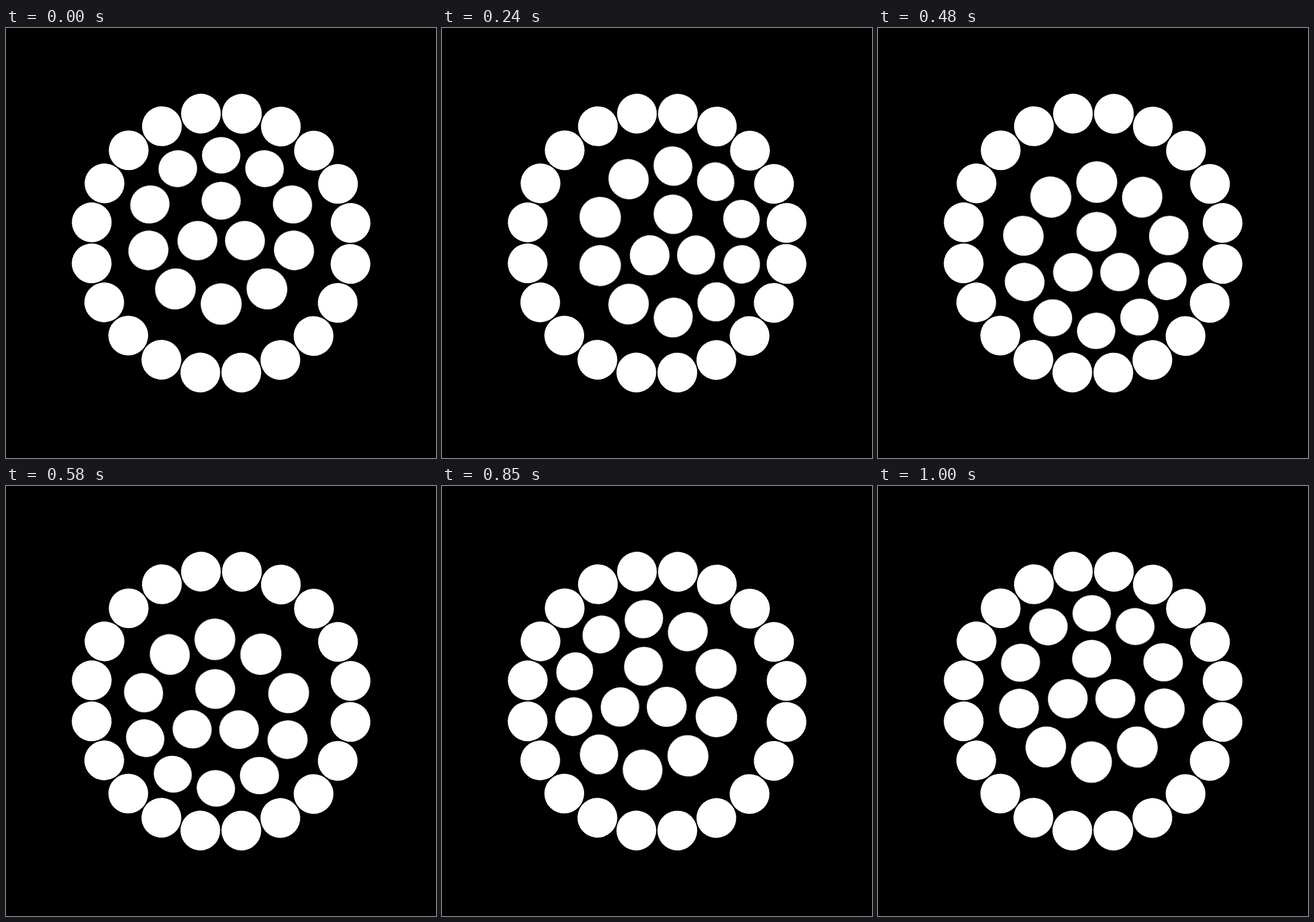
An HTML page without scripts that plays this animation: 720x720 px, repeating every 1030 ms.

```html
<!DOCTYPE html>
<html lang="en">
<head>
<meta charset="utf-8">
<title>Wobbling dots</title>
<style>
  @property --lean {
    syntax: "<angle>";
    inherits: false;
    initial-value: 0deg;
  }
  html, body {
    margin: 0;
    width: 100%;
    height: 100%;
    overflow: hidden;
    background: #000;
  }
  svg {
    position: absolute;
    fill: #fff;
  }
  .ring {
    left: 0;
    top: 0;
    width: 720px;
    height: 720px;
  }
  /* A tilted plate whose lean direction circles clockwise */
  .plate {
    left: 190px;
    top: 190px;
    width: 340px;
    height: 340px;
    transform: perspective(604px) translateZ(-169.1px)
      rotateZ(var(--lean)) rotateX(9.1deg) rotateZ(calc(-1 * var(--lean)))
      translateZ(171.3px);
    animation: wobble 1030ms infinite;
  }
  @keyframes wobble {
    0% { --lean: 0deg; animation-timing-function: steps(16); }
    46.6% { --lean: 168.2deg; animation-timing-function: step-end; }
    50.48% { --lean: 179.2deg; animation-timing-function: steps(17); }
    100% { --lean: 365.2deg; }
  }
</style>
</head>
<body>
<svg class="ring" viewBox="-360.2 -360.2 720 720">
  <defs>
    <circle id="rim" cy="-219.4" r="33.3"/>
    <g id="quarter">
      <use href="#rim" transform="rotate(9.13)"/>
      <use href="#rim" transform="rotate(27.13)"/>
      <use href="#rim" transform="rotate(45.13)"/>
      <use href="#rim" transform="rotate(63.13)"/>
      <use href="#rim" transform="rotate(81.13)"/>
    </g>
  </defs>
  <use href="#quarter"/>
  <use href="#quarter" transform="rotate(90)"/>
  <use href="#quarter" transform="rotate(180)"/>
  <use href="#quarter" transform="rotate(270)"/>
</svg>
<svg class="plate" viewBox="-170.3 -170.3 340 340">
  <defs>
    <circle id="dot" cy="-126.8" r="33.2"/>
    <circle id="core" cy="-45.7" r="33.2"/>
    <g id="half">
      <use href="#dot"/>
      <use href="#dot" transform="rotate(36)"/>
      <use href="#dot" transform="rotate(72)"/>
      <use href="#dot" transform="rotate(108)"/>
      <use href="#dot" transform="rotate(144)"/>
    </g>
  </defs>
  <use href="#half"/>
  <use href="#half" transform="rotate(180)"/>
  <use href="#core"/>
  <use href="#core" transform="rotate(120)"/>
  <use href="#core" transform="rotate(240)"/>
</svg>
</body>
</html>
```
